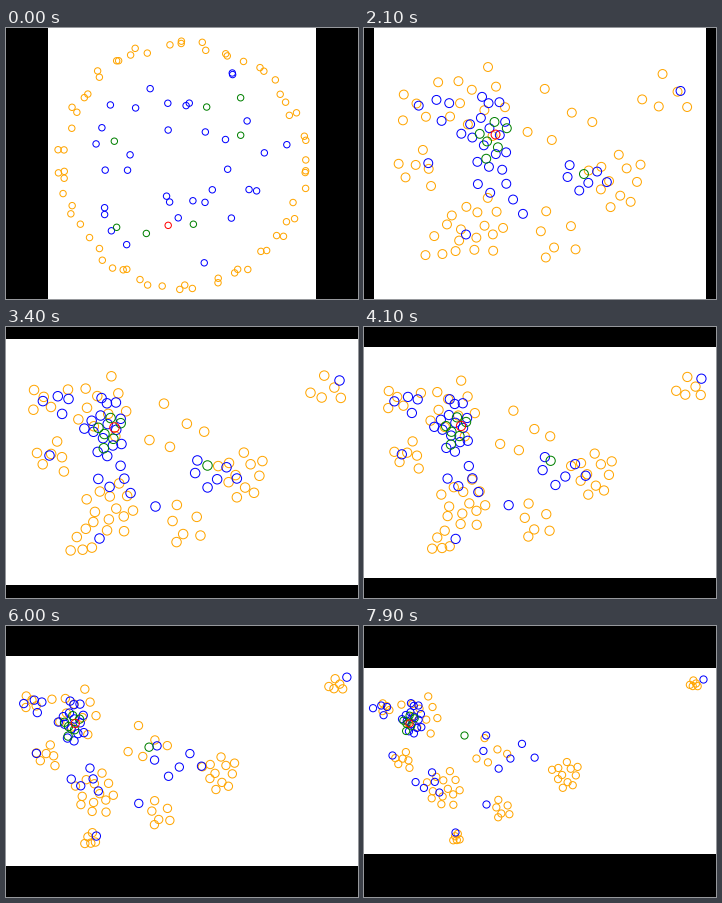
A matplotlib script that plays this animation: 352x271 px, repeating every 8 s.

```python
import numpy as np
import matplotlib.pyplot as plt
from matplotlib.animation import FuncAnimation
from matplotlib.patches import Rectangle

W, H, DPI = 352, 271, 64
FRAMES, STEP = 80, 100
PT = 72 / DPI  # points per pixel
MIX, SPLIT, END = 1.2, 3.4, 7.9  # seconds: untangled, drifting apart, last
CENTER = np.array([176, 135.5])
rng = np.random.default_rng(4)

# Starting ring: inner radius, outer radius, phase.
RINGS = {
    "orange": (116, 126, 0),
    "blue": (35, 108, 0.3),
    "green": (50, 98, 1),
    "red": (63, 63, 1.8),
}

# Clusters: size, centre at MIX, SPLIT and END, radius at MIX and END,
# height relative to width.
CLUSTERS = {
    "orange": [
        (5, (272, 68), (322, 60), (330, 57), 38, 5, 1),
        (11, (268, 160), (235, 145), (201, 147), 34, 15, 1),
        (5, (88, 218), (75, 217), (92, 212), 30, 5, 1),
        (6, (193, 222), (175, 198), (136, 183), 34, 11, 1),
        (13, (122, 222), (105, 182), (80, 163), 32, 19, 1),
        (6, (66, 165), (48, 130), (40, 134), 26, 10, 1),
        (4, (66, 98), (32, 73), (20, 81), 24, 6, 1),
        (11, (127, 65), (94, 78), (57, 88), 45, 22, 1),
        (5, (222, 78), (168, 100), (126, 125), 45, 19, 1),
    ],
    "blue": [
        (15, (143, 105), (98, 98), (48, 91), 29, 11, 1.6),
        (5, (160, 167), (112, 152), (66, 156), 22, 14, 1),
        (6, (212, 144), (205, 146), (139, 125), 28, 38, 0.6),
        (4, (95, 92), (50, 76), (16, 83), 22, 9, 1),
        (1, (284, 82), (333, 53), (339, 53), 0, 0, 1),
        (1, (118, 193), (93, 211), (91, 206), 0, 0, 1),
        (1, (164, 198), (149, 179), (122, 178), 0, 0, 1),
        (1, (99, 149), (43, 128), (28, 129), 0, 0, 1),
    ],
    "green": [
        (6, (150, 115), (102, 102), (44, 95), 22, 8, 1.2),
        (1, (205, 146), (201, 138), (100, 109), 0, 0, 1),
    ],
    "red": [(1, (146, 117), (108, 100), (45, 97), 0, 0, 1)],
}


def disc(n):
    """Sunflower spread of n points in the unit disc, slightly shaken."""
    k = np.arange(n)
    a = 2.4 * k + rng.uniform(0, 2 * np.pi)
    r = np.sqrt((k + 0.5) / n)
    return np.c_[r * np.cos(a), r * np.sin(a)] + rng.uniform(-0.12, 0.12, (n, 2))


def ring(n, inner, outer, phase):
    jitter = rng.uniform(-0.8, 0.8, n) * (1 - 1 / n)
    a = phase + 2 * np.pi * (np.arange(n) + jitter) / n
    r = rng.uniform(inner, outer, n)
    return CENTER + np.c_[r * np.cos(a), r * np.sin(a)]


def angle(p):
    return np.arctan2(*(p - CENTER).T[::-1])


def glide(keys, t):
    """Parabola through the three keys in logarithmic time."""
    s, (a, b, c) = np.log(t), np.log([MIX, SPLIT, END])
    k0, k1, k2 = np.array(keys, float)
    return (k0 * (s - b) * (s - c) / ((a - b) * (a - c))
            + k1 * (s - a) * (s - c) / ((b - a) * (b - c))
            + k2 * (s - a) * (s - b) / ((c - a) * (c - b)))


class Nodes:
    def __init__(self, color):
        self.clusters = [(row[1:4], *row[4:], disc(row[0]))
                         for row in CLUSTERS[color]]
        self.mix = self.settled(MIX)
        # Hand out ring places in the angular order of the first targets.
        places = ring(len(self.mix), *RINGS[color])
        self.start = np.empty_like(places)
        self.start[np.argsort(angle(self.mix))] = places[np.argsort(angle(places))]
        self.dots = ax.scatter(*self.start.T, facecolors="none",
                               edgecolors=color, linewidths=PT)

    def settled(self, t):
        u = (t - MIX) / (END - MIX)
        return np.concatenate([
            glide(keys, t) + r0 ** (1 - u) * r1 ** u * spread * [1, tall]
            for keys, r0, r1, tall, spread in self.clusters])

    def at(self, t):
        if t >= MIX:
            return self.settled(t)
        ease = np.sin(np.pi / 2 * t / MIX)
        return self.start + (self.mix - self.start) * ease


def page_size(t):
    w = np.interp(t, [0, 0.9, 2.1, 2.7], [268, 283, 332, 352])
    h = np.interp(t, [2.7, 3.4, 4.6, 5.5, 6.4, 7.9],
                  [271, 246, 220, 212, 209, 186])
    return int(round(w)), int(round(h))


def radius(t):
    return np.interp(t, [0, 1.2, 3, 4.8, 7.9], [3.2, 4.1, 4.8, 4.5, 3.6])


fig = plt.figure(figsize=(W / DPI, H / DPI), dpi=DPI, facecolor="black")
ax = fig.add_axes([0, 0, 1, 1])
ax.set_xlim(0, W)
ax.set_ylim(H, 0)
ax.axis("off")
page = ax.add_patch(Rectangle((0, 0), W, H, fc="white", ec="none", aa=False))
groups = [Nodes(color) for color in CLUSTERS]


def draw(i):
    t = i * STEP / 1000
    w, h = page_size(t)
    page.set_bounds((W - w) // 2, (H - h) // 2, w, h)
    size = (2 * radius(t) * PT) ** 2
    for g in groups:
        g.dots.set_offsets(g.at(t) + 0.5)
        g.dots.set_sizes([size])
    return [page] + [g.dots for g in groups]


anim = FuncAnimation(fig, draw, frames=FRAMES, interval=STEP, repeat=True)
plt.show()
```
